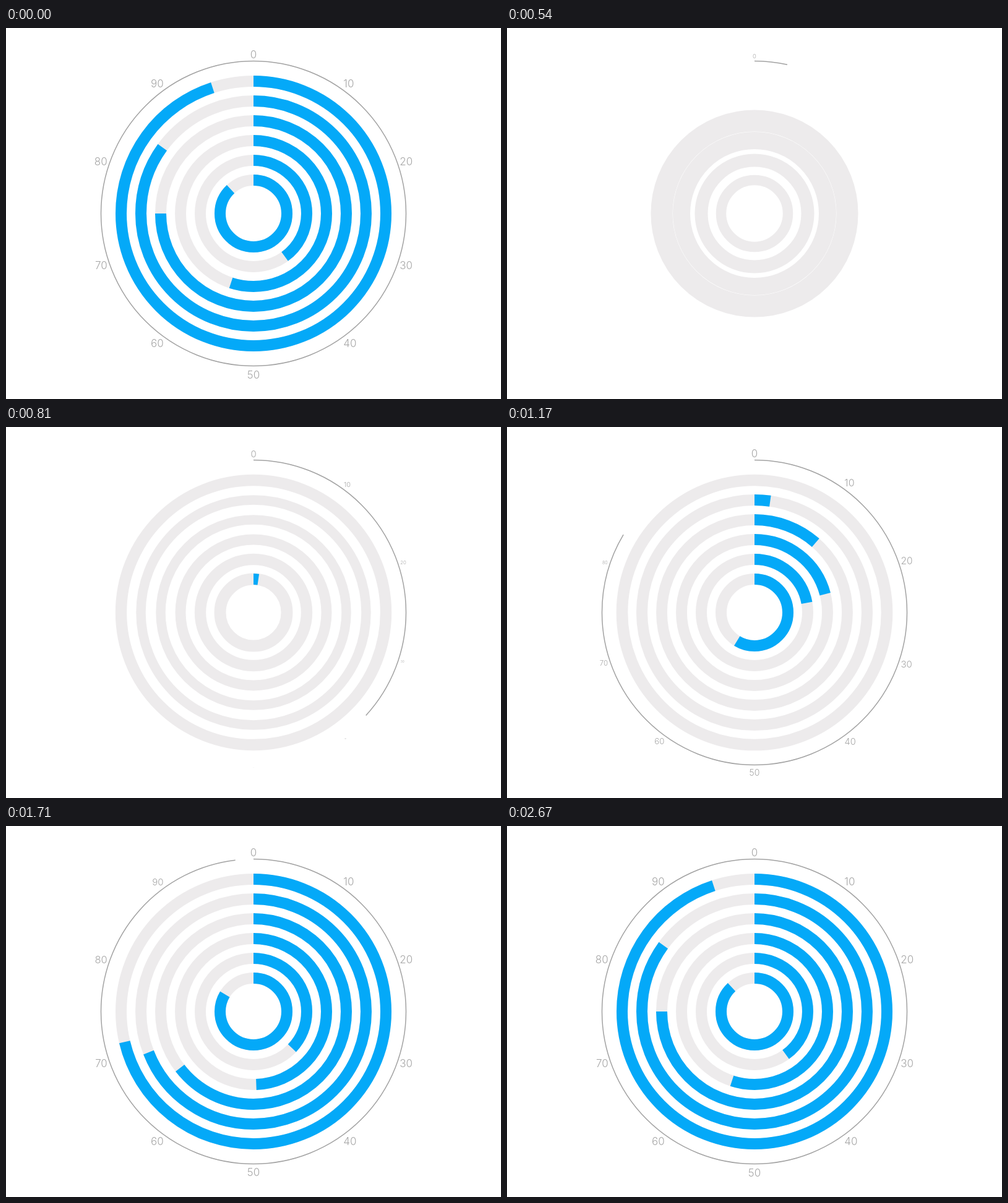
These frames come from a looping animation (800 px wide and 600 px high, 2730 ms). An HTML page with a canvas:

```html
<!DOCTYPE html>
<html lang="en">
<head>
<meta charset="utf-8">
<title>Radial progress chart</title>
<style>
  html, body { margin: 0; width: 100%; height: 100%; overflow: hidden; background: #fff; }
  canvas { display: block; }
</style>
</head>
<body>
<canvas id="stage" width="800" height="600"></canvas>
<script>
const ctx = document.getElementById('stage').getContext('2d');
const TAU = Math.PI * 2;
const LOOP = 2730, STEP = 30, START = 300;
const DIAL = 246.5, LABEL_RADIUS = 250.5, RING_WIDTH = 18;
const values = [0.88, 0.4, 0.55, 0.75, 0.85, 0.95];
const labelStarts = [300, 525, 607, 654, 692, 732, 785, 862, 981, 1188];

// Bezier easing with control points (x1, 0) and (0, 1)
function ease(u, x1) {
  if (u <= 0) return 0;
  if (u >= 1) return 1;
  let low = 0, high = 1, s;
  for (let i = 0; i < 24; i++) {
    s = (low + high) / 2;
    if (3 * (1 - s) ** 2 * s * x1 + s ** 3 < u) low = s; else high = s;
  }
  return s * s * (3 - 2 * s);
}

// Damped wobble of a ring's thickness
function ringWidth(age) {
  if (age <= 0) return 0;
  const fade = Math.max(0, 1 - age / 800);
  return RING_WIDTH * (1 + 80 / age * fade * Math.sin(TAU * age / 430));
}

function arc(radius, portion, width, color) {
  if (portion <= 0 || width <= 0) return;
  ctx.beginPath();
  ctx.arc(0, 0, radius, -TAU / 4, TAU * (portion - 0.25));
  ctx.lineWidth = width;
  ctx.strokeStyle = color;
  ctx.stroke();
}

function label(index, scale) {
  if (scale <= 0) return;
  const angle = index * TAU / 10;
  const side = index % 5 ? (index < 5 ? 1 : -1) : 0;
  const below = index > 2 && index < 8;
  ctx.save();
  ctx.translate(LABEL_RADIUS * Math.sin(angle), -LABEL_RADIUS * Math.cos(angle));
  ctx.scale(scale, scale);
  ctx.textAlign = side ? (side > 0 ? 'left' : 'right') : 'center';
  ctx.fillText(index * 10, -2 * side, index === 5 ? 16 : below ? 13 : -1);
  ctx.restore();
}

function draw(time) {
  ctx.setTransform(1, 0, 0, 1, 0, 0);
  ctx.fillStyle = '#fff';
  ctx.fillRect(0, 0, 800, 600);
  ctx.translate(400, 300);

  values.forEach((value, i) => {
    const radius = 54 + 32 * i;
    arc(radius, 1, ringWidth(time - START - 60 * i), '#edebec');
    arc(radius, value * ease((time - 720 - 90 * i) / 1500, 0.25), RING_WIDTH, '#04a9f8');
  });
  arc(DIAL, ease((time - START) / 1800, 0.5), 1.5, '#a2a2a2');

  ctx.fillStyle = '#a6a6a6';
  ctx.font = '300 17px Inter, sans-serif';
  labelStarts.forEach((start, i) => label(i, ease((time - start) / 1000, 0.25)));
}

function frame() {
  const time = Math.floor(performance.now() % LOOP / STEP) * STEP;
  draw(time < START ? LOOP : time); // the finished chart rests before each run
  requestAnimationFrame(frame);
}
frame();
</script>
</body>
</html>
```
